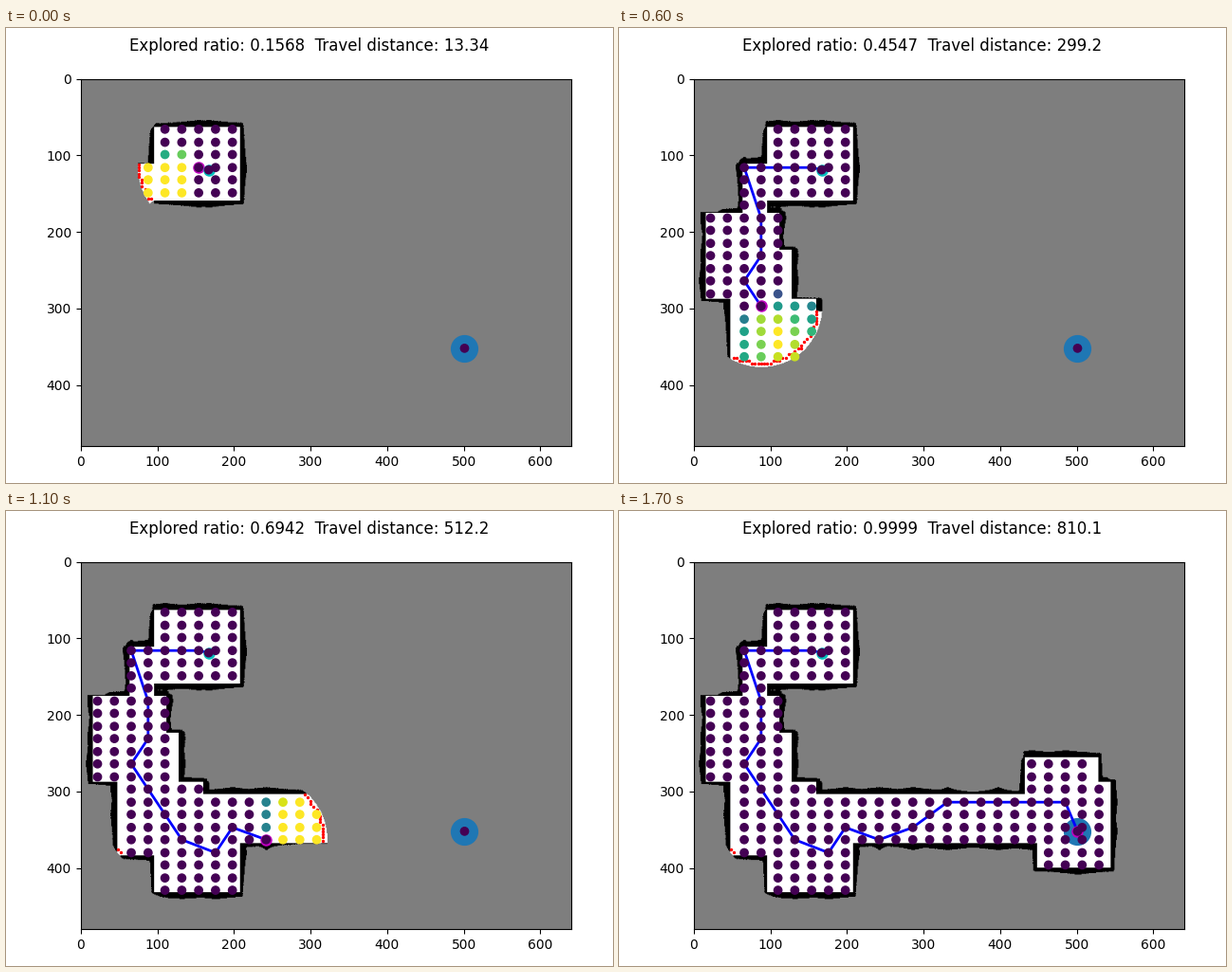
Animation of 640x480 px, one loop 1.8 s. Source, as a matplotlib script:

```python
import math

import numpy as np
import matplotlib.pyplot as plt
from matplotlib.animation import FuncAnimation

W, H = 640, 480
STEP_MS = 100
WALL, UNKNOWN, FREE = 1, 127, 255
SENSOR_RANGE = 80
UTILITY_RANGE = 70
MIN_UTILITY = 4
WALL_DEPTH = 10
BLOCK = 4
CELL = 16

# Floor plan: overlapping rooms as x0, y0, x1, y1 in cells
ROOMS = [(6, 4, 13, 10), (4, 7, 6, 11), (1, 11, 7, 18), (3, 14, 8, 24),
         (8, 18, 10, 24), (6, 19, 13, 27), (10, 19, 28, 23),
         (27, 16, 33, 23), (28, 23, 33, 25), (33, 18, 34, 25)]

# The robot visits nodes of an even 30 x 30 lattice between start and target
XS = np.linspace(0, W - 1, 30).round().astype(int).tolist()
YS = np.linspace(0, H - 1, 30).round().astype(int).tolist()
START, TARGET = (167, 119), (501, 352)
STOPS = [(7, 7), (5, 7), (3, 7), (4, 11), (4, 14), (3, 16), (4, 18), (5, 20),
         (6, 22), (8, 23), (9, 21), (11, 22), (13, 21), (15, 19), (18, 19),
         (20, 19), (22, 19)]
ROUTE = [START] + [(XS[i], YS[j]) for i, j in STOPS] + [TARGET]


def floor_plan():
    plan = np.full((H, W), WALL, dtype=np.uint8)
    for x0, y0, x1, y1 in ROOMS:
        plan[y0 * CELL:y1 * CELL, x0 * CELL:x1 * CELL] = FREE
    return plan


def walk(x, y, x1, y1):
    """Yield the 4-connected cells from (x, y) up to, not including, (x1, y1)."""
    dx, dy = abs(x1 - x), abs(y1 - y)
    sx = 1 if x1 > x else -1
    sy = 1 if y1 > y else -1
    error = dx - dy
    for _ in range(dx + dy):
        yield x, y
        if error > 0:
            x += sx
            error -= 2 * dy
        else:
            y += sy
            error += 2 * dx


def sense(pos, plan, belief):
    """Cast rays all round; each one sinks a little way into a wall."""
    x0, y0 = pos
    for i in range(720):
        a = math.radians(i / 2)
        x1 = round(x0 + SENSOR_RANGE * math.cos(a))
        y1 = round(y0 + SENSOR_RANGE * math.sin(a))
        hits = 0
        for x, y in walk(x0, y0, x1, y1):
            if not (0 <= x < W and 0 <= y < H):
                break
            cell = plan[y, x]
            if cell == WALL:
                hits += 1
                if hits >= WALL_DEPTH:
                    break
            elif hits:
                break
            belief[y, x] = cell


def find_frontier(belief):
    """Free blocks that border on some unknown blocks."""
    rows, cols = H // BLOCK, W // BLOCK
    coarse = belief.reshape(rows, BLOCK, cols, BLOCK).min(axis=(1, 3))
    unknown = np.pad((coarse == UNKNOWN).astype(int), 1)
    around = sum(unknown[1 + j:1 + j + rows, 1 + i:1 + i + cols]
                 for j in (-1, 0, 1) for i in (-1, 0, 1) if i or j)
    y, x = np.nonzero((coarse == FREE) & (around > 1) & (around < 8))
    return np.column_stack([x, y]) * BLOCK


def visible(a, b, belief):
    return all(belief[y, x] == FREE for x, y in walk(*a, *b))


def utility(node, frontier, belief):
    """Count the frontier points a node can see; a handful is not worth it."""
    dist = np.hypot(*(frontier - np.array(node)).T)
    near = frontier[dist < UTILITY_RANGE].tolist()
    count = sum(visible(node, point, belief) for point in near)
    return count if count >= MIN_UTILITY else 0


def explore():
    plan = floor_plan()
    belief = np.full((H, W), UNKNOWN, dtype=np.uint8)
    sense(START, plan, belief)

    states, travel = [], 0
    for step in range(1, len(ROUTE)):
        path = ROUTE[:step + 1]
        travel += math.dist(*path[-2:])
        sense(path[-1], plan, belief)
        frontier = find_frontier(belief)
        nodes = [(x, y) for x in XS for y in YS if belief[y, x] == FREE]
        values = [0 if n in path else utility(n, frontier, belief)
                  for n in nodes]
        ratio = (belief == FREE).sum() / (plan == FREE).sum()
        states.append(dict(
            belief=belief.copy(), frontier=frontier, path=path,
            nodes=nodes + [START, TARGET], values=np.array(values + [0, 0]),
            title=f"Explored ratio: {ratio:.4g}  Travel distance: {travel:.4g}"))
    return states


states = explore()
first = states[0]

plt.rcParams["font.family"] = "DejaVu Sans"
fig, ax = plt.subplots(figsize=(W / 100, H / 100), dpi=100)
title = fig.suptitle(first["title"], fontsize=12)
image = ax.imshow(first["belief"], cmap="gray", vmin=WALL, vmax=FREE)
ax.axis((0, W, H, 0))

ax.plot(*TARGET, "o", color="C0", markersize=20)
path_line, = ax.plot([], [], "b", linewidth=2)
robot, = ax.plot([], [], "mo", markersize=8)
ax.plot(*START, "co", markersize=8)
edge = ax.scatter([], [], c="r", s=2, zorder=3)
dots = ax.scatter(*zip(*first["nodes"]), c=first["values"], cmap="viridis",
                  zorder=5)
fig.tight_layout()


def update(step):
    s = states[step]
    title.set_text(s["title"])
    image.set_data(s["belief"])
    path_line.set_data(*zip(*s["path"]))
    robot.set_data(*zip(s["path"][-1]))
    edge.set_offsets(s["frontier"])
    dots.set_offsets(s["nodes"])
    dots.set_array(s["values"])
    dots.set_clim(0, max(1, s["values"].max()))
    return title, image, path_line, robot, edge, dots


anim = FuncAnimation(fig, update, frames=len(states), interval=STEP_MS,
                     repeat=True)
plt.show()
```
